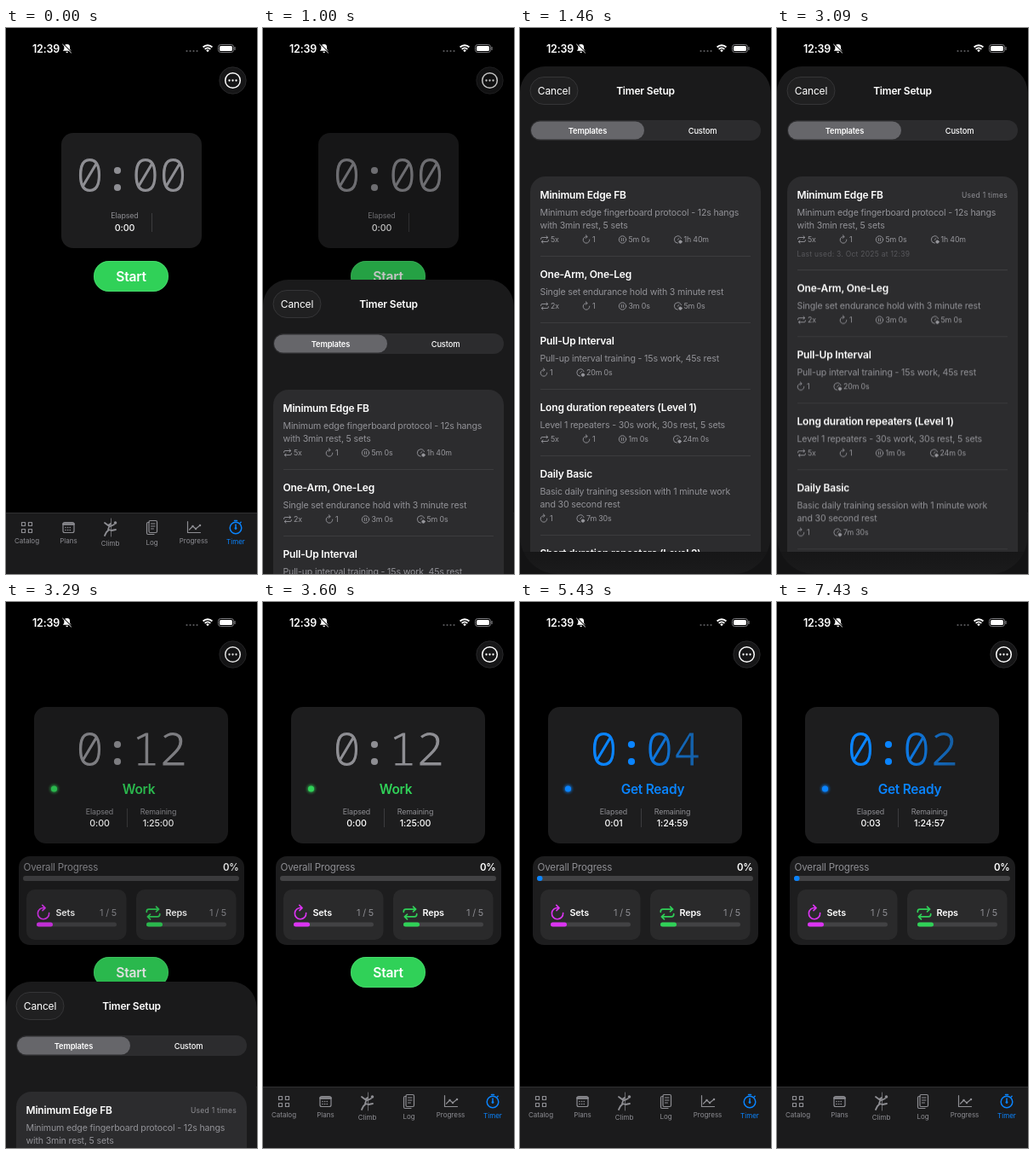
Animation, 295 px wide and 640 px high, one loop 8000 ms. Source, as an HTML page:

```html
<!DOCTYPE html>
<html lang="en">
<head>
<meta charset="utf-8">
<title>Training timer</title>
<style>
html, body { margin: 0; width: 100%; height: 100%; overflow: hidden; background: #000; }
svg { display: block; width: 295px; height: 640px; }
text { font-family: Inter, "Open Sans", sans-serif; fill: #fff; letter-spacing: -.015em; }
.mid { text-anchor: middle; }
.end { text-anchor: end; }
.semi { font-weight: 600; }
.gray { fill: #8e8e93; }
.line { fill: none; stroke: #8e8e93; stroke-width: 1.2; stroke-linecap: round; stroke-linejoin: round; }
.card { fill: #1d1d1e; }
.tile { fill: #2a2a2b; }
.track { fill: #424244; }
/* the card-coloured outline thins the strokes */
.digits { font: 300 55px "Noto Sans Mono", monospace; letter-spacing: -.3px; stroke: #1d1d1e; stroke-width: 1.2; }
.digits tspan { fill: none; stroke: none; }
.label { font-size: 8.9px; }
.value { font-size: 10.7px; font-weight: 500; }
.tab { font-size: 8px; text-anchor: middle; fill: #8e8e93; letter-spacing: 0; }
.head { font-size: 12px; font-weight: 600; }
.desc { font-size: 10.6px; fill: #929297; }
.stat { font-size: 8.8px; fill: #98989d; }
.note { font-size: 8.5px; letter-spacing: .03em; }
.sep { stroke: #3c3c3e; }

/* one 8 s loop, hard steps */
.idle, .setup, .work, .ready, .n4, .n3, .n2, .press, .dim, .sheet, .used, .later {
  animation: 8s step-end infinite;
}
.idle { animation-name: idle; }
.setup { animation-name: setup; }
.work { animation-name: work; }
.ready { animation-name: ready; }
.n4 { animation-name: n4; }
.n3 { animation-name: n3; }
.n2 { animation-name: n2; }
.press { animation-name: press; }
.dim { animation-name: dim; }
.sheet { animation-name: sheet; }
.used { animation-name: used; }
.later { animation-name: later; }
@keyframes idle { 0% { opacity: 1 } 38.625%, 100% { opacity: 0 } }
@keyframes setup { 0% { opacity: 0 } 38.625%, 100% { opacity: 1 } }
@keyframes work { 0% { opacity: 1 } 67.875%, 100% { opacity: 0 } }
@keyframes ready { 0% { opacity: 0 } 67.875%, 100% { opacity: 1 } }
@keyframes n4 { 0% { opacity: 1 } 80.375%, 100% { opacity: 0 } }
@keyframes n3 { 0% { opacity: 0 } 80.375% { opacity: 1 } 92.875%, 100% { opacity: 0 } }
@keyframes n2 { 0% { opacity: 0 } 92.875%, 100% { opacity: 1 } }
@keyframes press { 0% { opacity: 1 } 9.125% { opacity: .8 } 12.5%, 100% { opacity: 1 } }
@keyframes used { 0% { opacity: 0 } 38.625%, 100% { opacity: 1 } }
@keyframes later { 0% { transform: none } 38.625%, 100% { transform: translateY(16.3px) } }
@keyframes dim {
  0% { opacity: 0 } 11.125% { opacity: .06 } 12.5% { opacity: .23 } 13.875% { opacity: .3 }
  39.875% { opacity: .24 } 41.125% { opacity: .12 } 42.375% { opacity: .05 } 43.75%, 100% { opacity: 0 }
}
@keyframes sheet {
  0% { transform: translateY(600px) }
  11.125% { transform: translateY(527px) }
  12.5% { transform: translateY(250px) }
  13.875% { transform: translateY(84px) }
  15.375% { transform: translateY(24px) }
  16.75% { transform: translateY(7px) }
  18.25% { transform: none }
  39.875% { transform: translateY(150px) }
  41.125% { transform: translateY(400px) }
  42.375% { transform: translateY(530px) }
  43.75% { transform: translateY(580px) }
  45%, 100% { transform: translateY(600px) }
}
</style>
</head>
<body>
<svg viewBox="0 0 295 640">
  <defs>
    <linearGradient id="blue" gradientUnits="userSpaceOnUse" x1="84" x2="212" y1="0" y2="0">
      <stop offset=".35" stop-color="#0a84ff"/><stop offset="1" stop-color="#155c9f"/>
    </linearGradient>
    <linearGradient id="foot" x2="0" y2="1">
      <stop stop-color="#161617"/><stop offset="1" stop-color="#1b1b1c"/>
    </linearGradient>
    <clipPath id="list"><path d="M12 614V192a18 18 0 0 1 18-18H265a18 18 0 0 1 18 18V614Z"/></clipPath>
    <clipPath id="panel"><path d="M0 596V75A30 30 0 0 1 30 45H264.500A30 30 0 0 1 294.500 75V596A44 44 0 0 1 250.500 640H44A44 44 0 0 1 0 596Z"/></clipPath>
    <filter id="glow" x="-1" y="-1" width="3" height="3"><feGaussianBlur stdDeviation="1.8"/></filter>
    <g id="start">
      <rect x="103" width="88" height="36" rx="18" fill="#30d158"/>
      <rect x="103.5" y=".5" width="87" height="35" rx="17.5" fill="none" stroke="#5be07c" stroke-opacity=".5"/>
      <text class="mid semi" x="147" y="24" font-size="15.6">Start</text>
    </g>
    <!-- small icons, centred on 0,0 -->
    <g id="cw"><path d="M3.8.1A3.8 3.8 0 1 1 .6-3.4M-.7-5.200 1.200-3.400-.6-1.600"/></g>
    <g id="repeat"><path d="M-4.4-.6V-1a1.5 1.5 0 0 1 1.5-1.5H3.6M2-4.2 3.8-2.5 2-.9M4.4.6V1a1.5 1.5 0 0 1-1.5 1.5H-3.6M-2 4.2-3.8 2.5-2 .9"/></g>
    <g id="pause"><circle r="4.2"/><path d="M-1.2-1.6V1.6M1.2-1.6V1.6"/></g>
    <g id="clock"><path d="M4-1.4A4.2 4.2 0 1 0-.2 4.2M-.3.2 1.500-1.500"/><circle cx="3" cy="2.6" r="1.7" fill="currentColor"/></g>
  </defs>

  <rect width="295" height="640"/>

  <g id="home">
    <circle cx="266.5" cy="61.5" r="15.7" fill="#161617" stroke="#28282a"/>
    <circle cx="266.5" cy="61.5" r="8.8" fill="none" stroke="#fff" stroke-width="1.5"/>
    <path d="M262.5 61.5h.01m4 0h.01m4 0h.01" stroke="#fff" stroke-width="2.3" stroke-linecap="round"/>

    <g class="idle">
      <rect class="card" x="65" y="123" width="165" height="135" rx="14"/>
      <g id="zero"></g>
      <text class="label mid gray" x="139.5" y="223">Elapsed</text>
      <text class="value mid" x="139.5" y="238">0:00</text>
      <path class="sep" d="M171.5 217v22"/>
      <g class="press"><use href="#start" y="273"/></g>
    </g>

    <g class="setup">
      <rect class="card" x="33" y="123" width="228" height="160" rx="14"/>
      <text class="label mid gray" x="110" y="248.5">Elapsed</text>
      <text class="label mid gray" x="179" y="248.5">Remaining</text>
      <path class="sep" d="M142.5 242v22"/>
      <rect class="card" x="15" y="298" width="265" height="104" rx="13"/>
      <text class="gray" x="20.5" y="314.5" font-size="11.6">Overall Progress</text>
      <text class="end semi" x="273.5" y="314.5" font-size="11.4">0%</text>
      <rect class="track" x="20" y="321" width="254" height="6" rx="3"/>
      <g id="tiles"></g>

      <g class="work">
        <g id="twelve"></g>
        <circle cx="56.5" cy="219" r="5" fill="#30d158" opacity=".6" filter="url(#glow)"/>
        <circle cx="56.5" cy="219" r="3.6" fill="#30d158"/>
        <text class="mid semi" x="156" y="224.5" font-size="15.4" style="fill:#30d158">Work</text>
        <text class="value mid" x="110" y="263">0:00</text>
        <text class="value mid" x="179" y="263">1:25:00</text>
        <use href="#start" y="416"/>
      </g>

      <g class="ready">
        <circle cx="56.5" cy="219" r="5" fill="#0a84ff" opacity=".6" filter="url(#glow)"/>
        <circle cx="56.5" cy="219" r="3.6" fill="#0a84ff"/>
        <text class="mid semi" x="156" y="224.5" font-size="15.4" style="fill:#0a84ff">Get Ready</text>
        <rect x="20" y="321" width="6.5" height="6" rx="3" fill="#0a84ff"/>
        <g id="ticks"></g>
      </g>
    </g>

    <rect y="568" width="295" height="72" fill="#1b1b1c"/>
    <path d="M0 568.5H295" stroke="#303032"/>
    <g class="line">
      <path d="M18.5 579.5h4v4h-4zM26.5 579.5h4v4h-4zM18.5 587.5h4v4h-4zM26.5 587.5h4v4h-4z"/>
      <rect x="67" y="579.5" width="13" height="12" rx="2"/>
      <path d="M67.5 581.5h12" stroke-width="2.5"/>
      <path d="M70 585.5h7.5M70 588.5h5.5" stroke-width="1.5" stroke-dasharray=".1 2.5"/>
      <path d="M123.5 575v21" stroke-width=".7"/>
      <path d="M116 580l4 3 3-2M122 582l-2 6 4 1 5-1M121 588l-3 3-2 4M123 584l4-2" stroke-width="1.8"/>
      <circle cx="128.5" cy="580" r="1.2" fill="#8e8e93"/>
      <path d="M168 579.5h-1a1.5 1.5 0 0 0-1.5 1.5v11a1.5 1.5 0 0 0 1.5 1.5h7"/>
      <rect x="168" y="577.5" width="9.5" height="14" rx="1.5"/>
      <path d="M170.5 581h4.5m-4.5 3h4.5m-4.5 3h3" stroke-width="1"/>
      <path d="M213.5 578.5v13h15M215.5 588l4-4 3.5 3 5-4"/>
      <path d="M219.5 584h.01m3.5 3h.01m5-4h.01" stroke-width="2.5"/>
      <g stroke="#0a84ff" stroke-width="1.5">
        <circle cx="270" cy="586" r="6.8"/>
        <path d="M268.5 577.5h3M270 582v4.5M275.3 580l.8-.8"/>
      </g>
    </g>
    <circle cx="270" cy="586.5" r="1.4" fill="#0a84ff"/>
    <text class="tab" x="24.5" y="604">Catalog</text>
    <text class="tab" x="73.5" y="604">Plans</text>
    <text class="tab" x="122.5" y="607">Climb</text>
    <text class="tab" x="171.5" y="606">Log</text>
    <text class="tab" x="220.5" y="604">Progress</text>
    <text class="tab" x="270" y="605" style="fill:#0a84ff">Timer</text>
  </g>

  <rect class="dim" width="295" height="640"/>

  <g id="status">
    <text class="semi" x="31" y="28.5" font-size="12.5">12:39</text>
    <path d="M66.8 26.8h9.8l-1.500-2v-2.300a3.400 3.400 0 0 0-6.800 0v2.300ZM70.3 27.800h2.800a1.400 1.400 0 0 1-2.800 0Z" fill="#fff"/>
    <path d="M67.4 18.8 77.200 28.600" stroke="#000" stroke-width="1.2"/>
    <path d="M66.700 19.300 76.500 29" stroke="#fff" stroke-linecap="round"/>
    <path d="M212.5 27h.01m4 0h.01m4 0h.01m4 0h.01" stroke="#5a5a5d" stroke-width="2.2" stroke-linecap="round"/>
    <g fill="none" stroke="#fff" stroke-width="1.9">
      <path d="M231.6 22.5a7.6 7.6 0 0 1 10.8 0M233.7 24.9a4.7 4.7 0 0 1 6.6 0"/>
      <path d="M237 28.2l-1.8-1.9a2.5 2.5 0 0 1 3.6 0Z" fill="#fff" stroke="none"/>
    </g>
    <rect x="249.5" y="19.5" width="18" height="9" rx="2.8" fill="none" stroke="#7d7d80"/>
    <rect x="251" y="21" width="15" height="6" rx="1.6" fill="#fff"/>
    <path d="M269 22.5v3" stroke="#7d7d80" stroke-width="1.2" stroke-linecap="round"/>
  </g>

  <g class="sheet">
    <g clip-path="url(#panel)">
      <rect y="45" width="295" height="595" fill="#1a1a1b"/>
      <rect x="12" y="57.5" width="56" height="32" rx="16" fill="#202021" stroke="#353537"/>
      <text class="mid" x="40" y="78" font-size="12">Cancel</text>
      <text class="mid head" x="147.5" y="78">Timer Setup</text>
      <rect x="12" y="108" width="271" height="24" rx="12" fill="#2c2c2e"/>
      <rect x="13" y="109.5" width="133" height="21" rx="10.5" fill="#66666a"/>
      <text class="mid" x="79.5" y="123.5" font-size="9.3" font-weight="600">Templates</text>
      <text class="mid" x="214.5" y="123.5" font-size="9.3" font-weight="500">Custom</text>
      <g clip-path="url(#list)">
        <rect x="12" y="174" width="271" height="450" fill="#2c2c2e"/>
        <g id="first"></g>
        <g class="used">
          <text class="note end gray" x="271" y="199">Used 1 times</text>
          <text class="note" x="23.5" y="267.5" style="fill:#58585c">Last used: 3. Oct 2025 at 12:39</text>
        </g>
        <g class="later" id="later"></g>
      </g>
      <rect y="614" width="295" height="26" fill="url(#foot)"/>
    </g>
  </g>
</svg>
<script>
const fill = (id, html) => { document.getElementById(id).innerHTML = html; };
const icon = (name, x, y, color = '#98989d', scale = 1, width = .9) =>
  `<use href="#${name}" transform="translate(${x} ${y}) scale(${scale})" color="${color}" fill="none"
    stroke="${color}" stroke-width="${width}" stroke-linecap="round" stroke-linejoin="round"/>`;

// large readout; round dots stand over the colon
const readout = (sec, paint, dots = paint) => `
  <text class="digits" x="82" y="192" style="fill:${paint}">0<tspan>:</tspan>${sec}</text>
  <g fill="${dots}"><circle cx="131" cy="167" r="4.1"/><circle cx="131" cy="187" r="4.1"/></g>`;

const rows = [
  ['Minimum Edge FB', ['Minimum edge fingerboard protocol - 12s hangs', 'with 3min rest, 5 sets'],
    [['repeat', 29, '5x'], ['cw', 78, '1'], ['pause', 120.5, '5m 0s'], ['clock', 185.5, '1h 40m']]],
  ['One-Arm, One-Leg', ['Single set endurance hold with 3 minute rest'],
    [['repeat', 29, '2x'], ['cw', 78, '1'], ['pause', 120.5, '3m 0s'], ['clock', 185.5, '5m 0s']]],
  ['Pull-Up Interval', ['Pull-up interval training - 15s work, 45s rest'],
    [['cw', 28, '1'], ['clock', 71, '20m 0s']]],
  ['Long duration repeaters (Level 1)', ['Level 1 repeaters - 30s work, 30s rest, 5 sets'],
    [['repeat', 29, '5x'], ['cw', 78, '1'], ['pause', 120.5, '1m 0s'], ['clock', 184.5, '24m 0s']]],
  ['Daily Basic', ['Basic daily training session with 1 minute work', 'and 30 second rest'],
    [['cw', 28, '1'], ['clock', 71, '7m 30s']]],
  ['Short duration repeaters (Level 2)', [], []],
];

// y is the middle of the row's title
let y = 196;
const drawn = rows.map(([title, lines, stats], i) => {
  let out = i ? `<path class="sep" d="M24 ${y - 22}.5H271"/>` : '';
  out += `<text class="head" x="23.5" y="${y + 4.3}">${title}</text>`;
  lines.forEach((s, k) => { out += `<text class="desc" x="23.5" y="${y + 23.7 + 15 * k}">${s}</text>`; });
  const sy = y + 22 + 15 * lines.length;
  for (const [name, x, s] of stats)
    out += icon(name, x, sy) + `<text class="stat" x="${x + 7}" y="${sy + 3.2}">${s}</text>`;
  y = sy + 41;
  return out;
});
fill('first', drawn[0]);
fill('later', drawn.slice(1).join(''));

const tile = (x, name, label, color) => `
  <rect class="tile" x="${x}" y="337" width="117.5" height="59" rx="10"/>
  ${icon(name, x + 20, 364.5, color, 1.75, .95)}
  <text class="semi" x="${x + 34.5}" y="368" font-size="10.8">${label}</text>
  <text class="end gray" x="${x + 106}" y="368" font-size="10.8">1 / 5</text>
  <rect class="track" x="${x + 12}" y="375.5" width="94" height="5" rx="2.5"/>
  <rect x="${x + 12}" y="375.5" width="19" height="5" rx="2.5" fill="${color}"/>`;
fill('tiles', tile(24, 'cw', 'Sets', '#db34f2') + tile(153, 'repeat', 'Reps', '#30d158'));

fill('zero', readout('00', '#8e8e93'));
fill('twelve', readout('12', '#8e8e93'));
fill('ticks', [4, 3, 2].map(n => `<g class="n${n}">
  ${readout('0' + n, 'url(#blue)', '#0a84ff')}
  <text class="value mid" x="110" y="263">0:0${5 - n}</text>
  <text class="value mid" x="179" y="263">1:24:5${n + 5}</text></g>`).join(''));
</script>
</body>
</html>
```
